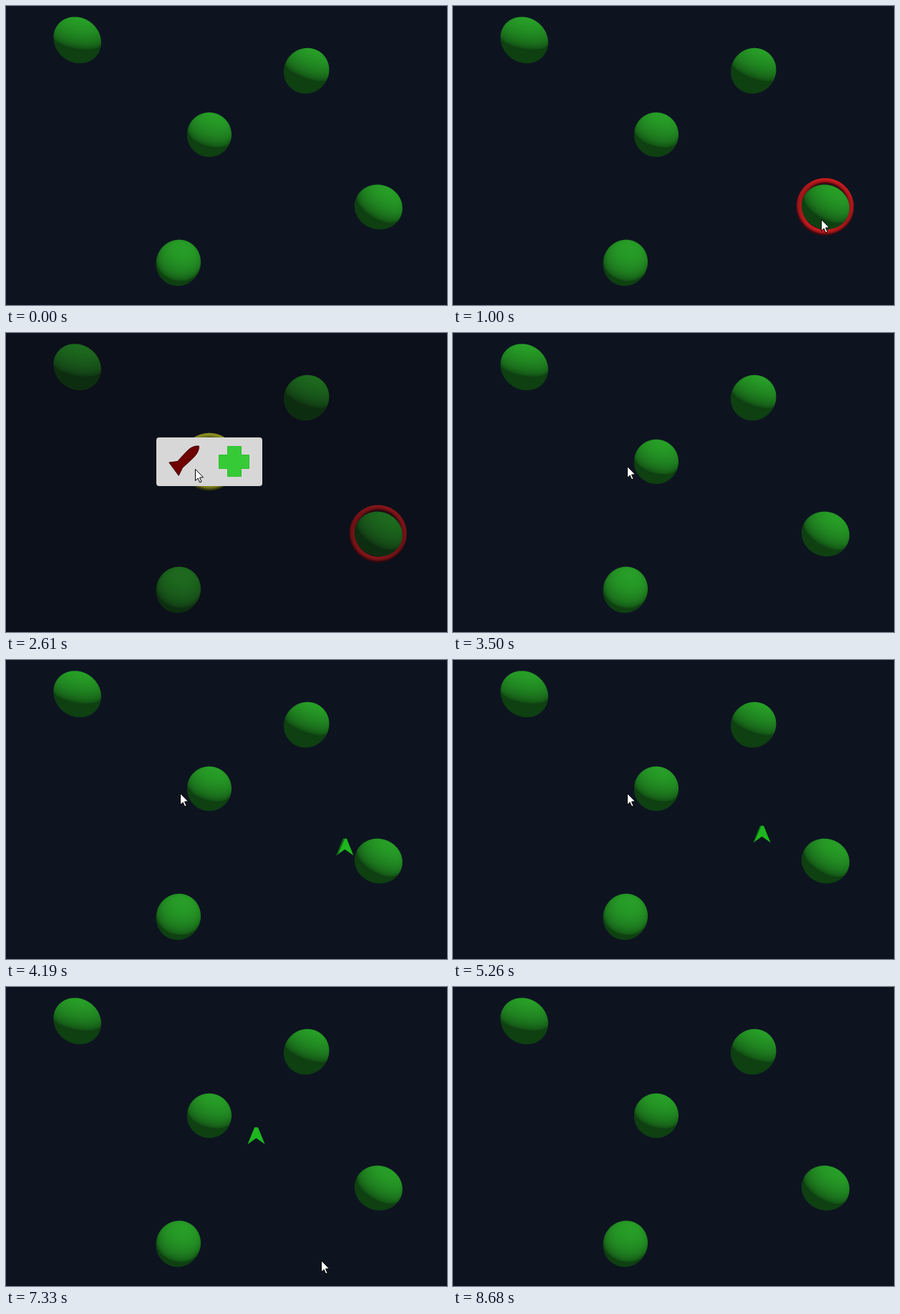
Write an HTML page with a canvas that moves like this. It is 616x418 px and loops after 9270 ms.

```html
<!DOCTYPE html>
<html lang="en">
<head>
<meta charset="utf-8">
<title>Planets</title>
<style>
html, body { margin: 0; width: 100%; height: 100%; overflow: hidden; background: #0d1420; }
canvas { display: block; }
</style>
</head>
<body>
<canvas id="stage" width="616" height="418"></canvas>
<script>
const LOOP = 9270;
const ctx = document.getElementById('stage').getContext('2d');

// Camera looks at the stage centre; one directional light.
const EYE = { x: 308, y: 209, f: 530 };
const LIGHT = [1, 3, 2].map(v => v / Math.sqrt(14));
const dot = (a, b) => a[0] * b[0] + a[1] * b[1] + a[2] * b[2];
const mix = (a, b, u) => a + (b - a) * u;

const GREEN = [[14, 64, 17], [39, 158, 39]];
const RED = [[62, 9, 15], [204, 28, 30]];
const YELLOW = [[70, 78, 16], [212, 216, 44]];

const TILE = 88;
const home = [519.6, 280.8], goal = [284, 180];
const planets = [home, goal, [100.3, 48.2], [419.3, 91], [241, 358.5]];

// A surface maps a stage point to its normal, or null outside.
function sphere(cx, cy) {
  const r = 31;
  const c = [cx - EYE.x, EYE.y - cy, -EYE.f];
  return (x, y) => {
    const d = [x - EYE.x, EYE.y - y, -EYE.f];
    const a = dot(d, d), b = dot(d, c);
    const disc = b * b - a * (dot(c, c) - r * r);
    if (disc < 0) return null;
    const k = (b - Math.sqrt(disc)) / a;
    return d.map((v, i) => (v * k - c[i]) / r);
  };
}

function torus(cx, cy) {
  const big = 36, tube = 4.2;
  return (x, y) => {
    const dx = x - cx, dy = cy - y, r = Math.hypot(dx, dy);
    const u = (r - big) / tube;
    return Math.abs(u) > 1 ? null : [dx / r * u, dy / r * u, Math.sqrt(1 - u * u)];
  };
}

// Shades a surface once into its own small canvas.
function bake([cx, cy], make, [dark, lit]) {
  const cv = document.createElement('canvas');
  cv.width = cv.height = TILE;
  const g = cv.getContext('2d');
  const img = g.createImageData(TILE, TILE);
  const surface = make(cx, cy);
  const left = Math.round(cx) - TILE / 2, top = Math.round(cy) - TILE / 2;
  const sub = 3;
  for (let i = 0; i < TILE * TILE; i++) {
    let hits = 0, glow = 0;
    for (let s = 0; s < sub * sub; s++) {
      const x = left + i % TILE + (s % sub + .5) / sub;
      const y = top + Math.floor(i / TILE) + (Math.floor(s / sub) + .5) / sub;
      const n = surface(x, y);
      if (!n) continue;
      hits++;
      glow += Math.pow(Math.max(0, dot(n, LIGHT)), .55);
    }
    if (!hits) continue;
    dark.forEach((v, c) => { img.data[i * 4 + c] = mix(v, lit[c], glow / hits); });
    img.data[i * 4 + 3] = 255 * hits / (sub * sub);
  }
  g.putImageData(img, 0, 0);
  return () => ctx.drawImage(cv, left, top);
}

const globes = planets.map(p => bake(p, sphere, GREEN));
const homeHover = bake(home, torus, YELLOW);
const homePicked = bake(home, torus, RED);
const goalHover = bake(goal, torus, YELLOW);

// Pointer sweeps: start, end and a Bezier curve; it rests in between.
const sweeps = [
  { from: 80, to: 670, path: [[330, 396], [68, 200], [320, -155], [517, 302]] },
  { from: 1000, to: 1920, path: [[517, 302], [50, -520], [-82, 800], [296, 186]] },
  { from: 2430, to: 2760, path: [[296, 186], [266, 193], [266, 193], [244, 187]] },
  { from: 6900, to: 7560, path: [[244, 187], [280, 290], [467, 421], [566, 430]] }
];

function bezier(points, u) {
  while (points.length > 1) {
    points = points.slice(1).map((p, i) => p.map((v, a) => mix(points[i][a], v, u)));
  }
  return points[0];
}

function pointerAt(t) {
  const s = sweeps.findLast(s => t >= s.from);
  if (!s || t >= sweeps.at(-1).to) return null;
  return bezier(s.path, Math.min(1, (t - s.from) / (s.to - s.from)));
}

function paint(path, fill, stroke) {
  const p = new Path2D(path);
  ctx.fillStyle = fill;
  ctx.fill(p);
  if (stroke) {
    ctx.strokeStyle = stroke;
    ctx.lineWidth = 1;
    ctx.stroke(p);
  }
}

function drawPointer([x, y]) {
  ctx.save();
  ctx.translate(Math.round(x) - .5, Math.round(y) - .5);
  paint('M0 0V16L3.6 12.6 6.2 18.4 8.6 17.4 6 11.6 11 11.3Z', '#fff', '#000');
  ctx.restore();
}

// Flies at constant speed from one planet to the other, hidden inside both ends.
function drawShip(t) {
  const step = 970 / 21;
  const u = Math.floor((t - 3000) / step) * step / 5680;
  const x = mix(518.9, 295, u), y = mix(269.3, 172.8, u);
  const side = Math.max(0, (x - 340) / 55);
  ctx.save();
  ctx.translate(x, y);
  paint('M-2.5 0H2.5L12 23.5 0 15-12 23.5Z', '#1eb71e');
  paint(`M-2.5 0h${side}l-9.5 22-${side} 1.5Z`, '#0f6213');
  ctx.restore();
}

function drawMenu(hover) {
  ctx.beginPath();
  ctx.roundRect(210, 146, 148, 68, 4);
  ctx.fillStyle = '#d7d7d7';
  ctx.fill();
  paint('M269.5 158Q260 157 252 166L239.5 179.5 227.8 181 241.2 199.3 246.5 188.5 260 176Q270 167 269.5 158Z',
    hover ? '#700000' : '#cc2222', hover ? '#3a0000' : '#991818');
  paint('M309.5 158.5h19v12h11v19h-11v11h-19v-11h-12v-19h12Z', '#36cb36', '#31bd31');
}

function draw(t) {
  const during = (a, b) => t >= a && t < b;
  ctx.fillStyle = '#0d1420';
  ctx.fillRect(0, 0, 616, 418);

  if (during(3000, 8680)) drawShip(t);
  if (during(620, 1000)) homeHover();
  if (during(1000, 3040)) homePicked();
  if (during(1900, 2690)) goalHover();
  globes.forEach(show => show());

  if (during(1970, 3040)) {
    ctx.globalAlpha = during(2020, 2940) ? 1 : .5;
    ctx.fillStyle = 'rgba(13,9,15,.35)';
    ctx.fillRect(0, 0, 616, 418);
    drawMenu(t >= 2540);
    ctx.globalAlpha = 1;
  }

  const p = pointerAt(t);
  if (p) drawPointer(p);
}

const start = performance.now();
function tick() {
  draw((performance.now() - start) % LOOP);
  requestAnimationFrame(tick);
}
tick();
</script>
</body>
</html>
```
